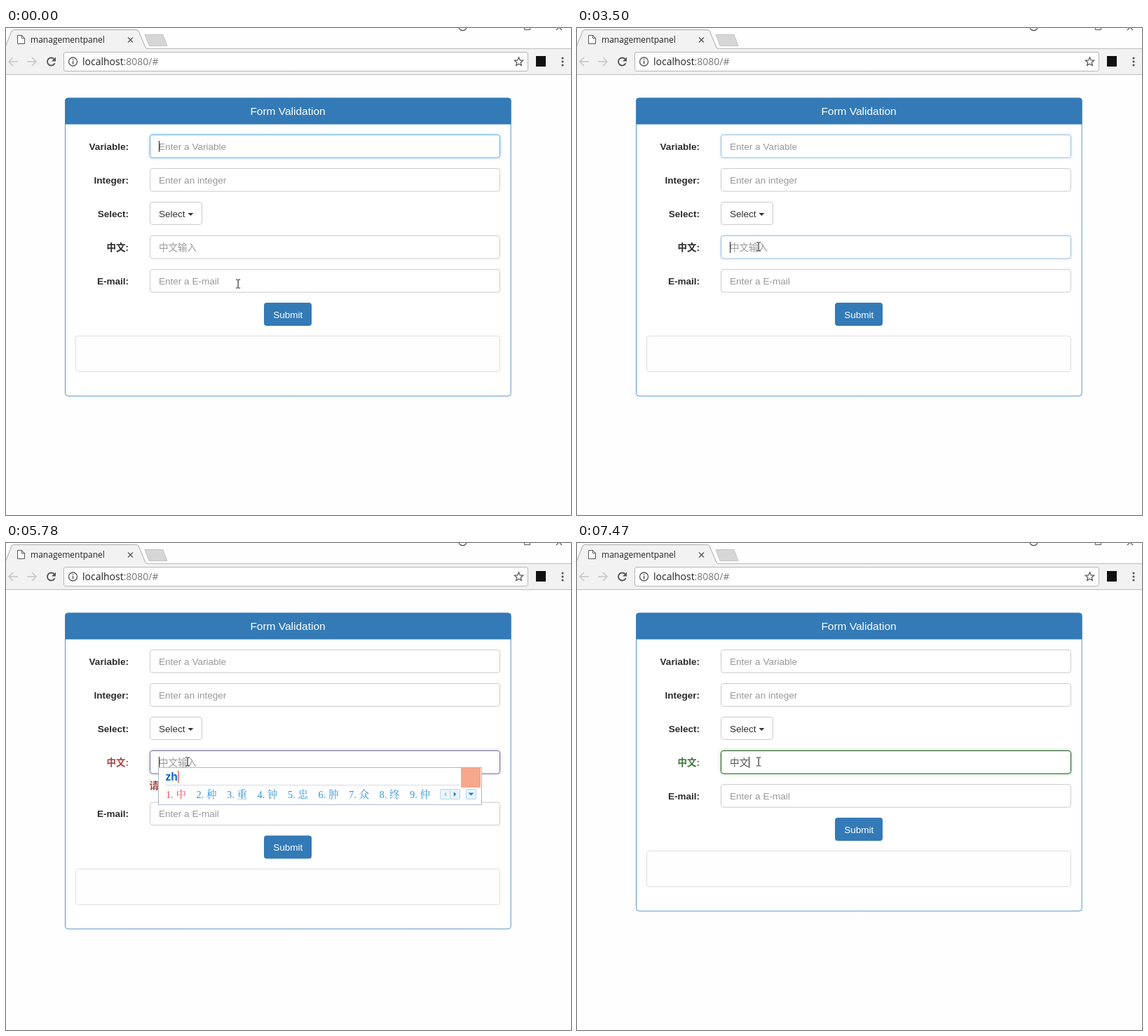
These frames come from a looping animation (806 by 695 pixels, 8000 ms). An HTML page with a canvas:

```html
<!DOCTYPE html>
<html lang="en">
<head>
<meta charset="utf-8">
<title>Form Validation</title>
<style>
html, body { margin: 0; width: 100%; height: 100%; overflow: hidden; background: #fefefe; }
canvas { display: block; width: 806px; height: 695px; }
</style>
</head>
<body>
<canvas id="stage" width="806" height="695"></canvas>
<script>
const ctx = document.getElementById('stage').getContext('2d');
const LOOP = 8000;
const SANS = '"Liberation Sans", Arial, "Noto Sans CJK SC", sans-serif';
const UI = '"Open Sans", sans-serif';
const BODY = `13.54px ${SANS}`;
const BOLD = `bold 13.54px ${SANS}`;
const BLUE = '#337ab7', INK = '#2b2b2b', ICON = '#555';

// border r, g, b, glow r, g, b, glow alpha
const PLAIN = [204, 204, 204, 102, 175, 233, 0];
const FOCUS = [102, 175, 233, 102, 175, 233, 0.6];
const BAD = [132, 53, 52, 206, 132, 131, 0.7];
const GOOD = [43, 84, 44, 103, 177, 104, 0.7];

const CLICK = 3440, TYPE = 5610, KEY = 100, ERROR = TYPE + KEY, COMMIT = 6450;
const BLINK = 530;
const GROW = 25.6, ROW = 48, FIELD_H = 32.6;

const LETTERS = 'zhognwe';
const HEADS = [...'中种重钟忠肿众终仲'];
const TAILS = [...'文为网外王位卫威午'];

const HOME = [331, 365];
const MOVES = [
  { at: 1120, len: 840, to: [362, 371] },
  { at: 1960, len: 350, to: [347, 385] },
  { at: 2310, len: 120, to: [366, 397] },
  { at: 2560, len: 630, to: [259, 312] }
];

function text(str, x, y, font, color, align = 'left') {
  ctx.font = font;
  ctx.fillStyle = color;
  ctx.textAlign = align;
  ctx.fillText(str, x, y);
}

function rect(x, y, w, h, color) {
  ctx.fillStyle = color;
  ctx.fillRect(x, y, w, h);
}

function paint(fill, stroke, width = 1) {
  if (fill) { ctx.fillStyle = fill; ctx.fill(); }
  if (stroke) { ctx.strokeStyle = stroke; ctx.lineWidth = width; ctx.stroke(); }
}

function box(x, y, w, h, r, fill, stroke) {
  ctx.beginPath();
  ctx.roundRect(x, y, w, h, r);
  paint(fill, stroke);
}

function poly(points, fill, stroke, width, close = true) {
  ctx.beginPath();
  points.forEach(([x, y]) => ctx.lineTo(x, y));
  if (close) ctx.closePath();
  paint(fill, stroke, width);
}

const line = (points, color, width) => poly(points, null, color, width, false);

function arc(x, y, r, from, to, fill, stroke, width) {
  ctx.beginPath();
  ctx.arc(x, y, r, from, to);
  paint(fill, stroke, width);
}

// filled triangle pointing along the given angle
function triangle(x, y, r, angle, color) {
  const c = Math.cos(angle), s = Math.sin(angle);
  poly([[x + c * r / 2, y + s * r / 2],
    [x - c * r / 2 - s * r, y - s * r / 2 + c * r],
    [x - c * r / 2 + s * r, y - s * r / 2 - c * r]], color);
}

const DOWN = Math.PI / 2;
const mix = (a, b, p) => a.map((v, i) => v + (b[i] - v) * p);
const clamp = p => Math.min(1, Math.max(0, p));
const ease = p => p * p * (3 - 2 * p);
const fade = d => ease(clamp(Math.floor(d / 50) / 2));

function drawTabs() {
  line([[0, 29.5], [806, 29.5]], '#bdbdbd');
  rect(0, 30, 806, 36, '#f2f2f2');
  const tab = [[-2, 30], [8, 4], [11, 2.5], [186, 2.5], [189, 4], [199, 28], [202, 30]];
  poly(tab, '#f2f2f2');
  line(tab, '#a9a9a9');
  poly([[198, 9.5], [224, 9.5], [230, 25.5], [204, 25.5]], '#d6d6d6', '#c4c4c4');
  line([[0, 66.5], [806, 66.5]], '#bcbcbc');

  poly([[16.5, 10.5], [22.5, 10.5], [26.5, 14.5], [26.5, 22.5], [16.5, 22.5]], '#fff', ICON);
  line([[22.5, 10.5], [22.5, 14.5], [26.5, 14.5]], ICON);
  text('managementpanel', 35, 21, `12px ${UI}`, '#222');
  for (const d of [-3.5, 3.5]) line([[177.5 - d, 13.5], [177.5 + d, 20.5]], ICON, 1.2);

  arc(651.5, -2, 5.7, 0, Math.PI, null, ICON, 1.2);
  box(739.5, -6, 8, 8.5, 0, null, ICON);
  for (const d of [-4, 4]) line([[789, -1], [789 + d, 3]], ICON, 1.1);
}

function drawToolbar() {
  for (const [x, dir] of [[4, 1], [43, -1]]) {
    line([[x, 48], [x + 13 * dir, 48]], '#c8c8c8', 1.6);
    line([[x + 6 * dir, 42], [x, 48], [x + 6 * dir, 54]], '#c8c8c8', 1.6);
  }
  arc(64.5, 48, 5.5, 0.4, 5.5, null, ICON, 1.8);
  poly([[71, 41.5], [71, 47.5], [65, 47.5]], ICON);

  box(82.5, 34.5, 662, 27, 2.5, '#fff', '#b6b6b6');
  arc(95.5, 48, 6, 0, 7, null, ICON, 1.3);
  rect(94.8, 47, 1.5, 4.5, ICON);
  rect(94.8, 44.3, 1.5, 1.6, ICON);
  text('localhost', 109, 53, `14px ${UI}`, '#222');
  text(':8080/#', 167.6, 53, `14px ${UI}`, '#777');

  const star = Array.from({ length: 10 }, (_, i) => {
    const a = i * Math.PI / 5 - Math.PI / 2, r = i % 2 ? 2.9 : 6.5;
    return [731.5 + r * Math.cos(a), 48.3 + r * Math.sin(a)];
  });
  poly(star, null, ICON, 1.2);
  rect(756, 40, 14, 15, '#111');
  for (let i = -1; i <= 1; i++) arc(794, 48 + 5 * i, 1.6, 0, 7, ICON);
}

function drawField(y, look, value, color) {
  const rgb = look.slice(0, 3), glow = look.slice(3);
  ctx.save();
  ctx.shadowBlur = 4;
  ctx.shadowColor = `rgba(${glow})`;
  box(205, y, 500, FIELD_H + 1, 4, '#fff');
  ctx.restore();
  box(205.5, y + 0.5, 499, FIELD_H, 3.5, '#fff', `rgb(${rgb})`);
  text(value, 218, y + 21.5, BODY, color);
}

function drawForm(t) {
  const invalid = t >= ERROR && t < COMMIT, done = t >= COMMIT;
  const dy = invalid ? GROW : 0;
  const rowY = i => 152 + ROW * i;
  const label = (str, i, shift = 0, color = INK) =>
    text(str, 175, rowY(i) + 21.7 + shift, BOLD, color, 'right');

  box(84.5, 100, 635.7, 425.2 + dy, 4, '#fff', '#5b95c8');
  box(84.3, 99.8, 636.2, 37.7, [4, 4, 0, 0], BLUE);
  text('Form Validation', 402, 123.5, `15.47px ${SANS}`, '#fff', 'center');

  label('Variable:', 0);
  drawField(rowY(0), mix(FOCUS, PLAIN, fade(t - CLICK)), 'Enter a Variable', '#999');
  label('Integer:', 1);
  drawField(rowY(1), PLAIN, 'Enter an integer', '#999');

  label('Select:', 2);
  box(205.5, rowY(2) + 0.5, 74, 32, 3.5, '#fff', '#ccc');
  text('Select', 218, rowY(2) + 21.8, BODY, '#333');
  triangle(263.4, 266, 4, DOWN, '#333');

  label('中文:', 3, 0, done ? '#3c763d' : invalid ? '#a94442' : INK);
  const look = [[CLICK, FOCUS], [ERROR, BAD], [COMMIT, GOOD]]
    .reduce((now, [at, next]) => mix(now, next, fade(t - at)), PLAIN);
  drawField(rowY(3), look, done ? '中文' : '中文输入', done ? '#555' : '#999');
  if (invalid) text('请输入中文', 204.5, 351, BOLD, '#a94442');

  label('E-mail:', 4, dy);
  drawField(rowY(4) + dy, PLAIN, 'Enter a E-mail', '#999');

  box(368, 392 + dy, 68, 33, 4, BLUE);
  text('Submit', 402.3, 413.5 + dy, BODY, '#fff', 'center');
  box(99.5, 439.5 + dy, 605, 51, 3.5, '#fefefe', '#ddd');
}

function drawCaret(t) {
  const lit = origin => Math.floor((t - origin) / BLINK) % 2 === 0;
  const typing = t >= TYPE && t < COMMIT;
  const origin = t < CLICK ? 120 - BLINK : t < COMMIT ? CLICK - 40 : COMMIT - 40;
  if (!typing && !lit(origin)) return;
  rect(t < COMMIT ? 218 : 245, t < CLICK ? 161 : 305, 1, 16, '#222');
}

function pointer(t) {
  const now = Math.floor(t / 60) * 60;
  return MOVES.reduce((p, m) => mix(p, m.to, ease(clamp((now - m.at) / m.len))), HOME).map(Math.round);
}

function drawPointer(t) {
  const [x, y] = pointer(t);
  const overField = [296, 344].some(top => y >= top && y < top + 34);
  if (overField) {
    rect(x - 0.5, y - 6, 1.2, 12, '#333');
    for (const end of [y - 6.5, y + 5.5]) {
      rect(x - 3, end, 2.6, 1.1, '#333');
      rect(x + 0.6, end, 2.6, 1.1, '#333');
    }
    return;
  }
  const shape = [[0, 0], [0, 12.5], [2.8, 10], [4.8, 14.6], [6.8, 13.7], [4.9, 9.3], [8.6, 9]];
  poly(shape.map(([px, py]) => [x + px + 0.5, y + py + 0.5]), '#fff', '#222');
}

function drawInputMethod(t) {
  if (t < TYPE || t >= COMMIT) return;
  const count = Math.min(LETTERS.length, 1 + Math.floor((t - TYPE) / KEY));
  const pairs = count < 6 ? 0 : count === 6 ? HEADS.length : 4;
  const words = HEADS.map((head, i) => i < pairs ? head + TAILS[i] : head);
  const em = 14.5, numerals = `${em}px "Liberation Serif", serif`;
  const end = 228 + (3 * HEADS.length + pairs) * em;
  const right = Math.round(end + 59.5);

  box(217.5, 320.5, right - 218, 53, 0, '#fff', '#a9b8c6');
  text(LETTERS.slice(0, count), 227.5, 339, `bold 15.6px ${SANS}`, '#0b62c4');
  rect(228 + ctx.measureText(LETTERS.slice(0, count)).width, 325, 1.2, 17, '#e33');
  rect(227, 345, right - 258, 1, '#d5dce3');
  rect(right - 30, 321, 28, 28, '#f6a78c');

  let x = 228;
  words.forEach((word, i) => {
    const color = i ? '#2f96dd' : '#f04848';
    text(i + 1, x, 363.5, numerals, color);
    text('.', x + em / 2, 363.5, numerals, color);
    text(word, x + em, 363.5, `300 ${em}px "Noto Serif CJK SC", "Noto Sans CJK SC", sans-serif`, color);
    x += (2 + word.length) * em;
  });

  const bx = Math.round(end) - 0.5;
  for (const dx of [0, 14, 37]) box(bx + dx, 351.5, 14, 14, 1, '#eaf5fd', '#b4d4ee');
  triangle(bx + 7, 358.5, 3.5, Math.PI, '#a9cbe6');
  triangle(bx + 21, 358.5, 3.5, 0, '#1e7fd0');
  triangle(bx + 44, 358.5, 4, DOWN, '#1e7fd0');
}

function draw(t) {
  rect(0, 0, 806, 695, '#fefefe');
  drawTabs();
  drawToolbar();
  drawForm(t);
  drawCaret(t);
  drawPointer(t);
  drawInputMethod(t);
}

const start = performance.now();
function tick() {
  draw((performance.now() - start) % LOOP);
  requestAnimationFrame(tick);
}
tick();
</script>
</body>
</html>
```
